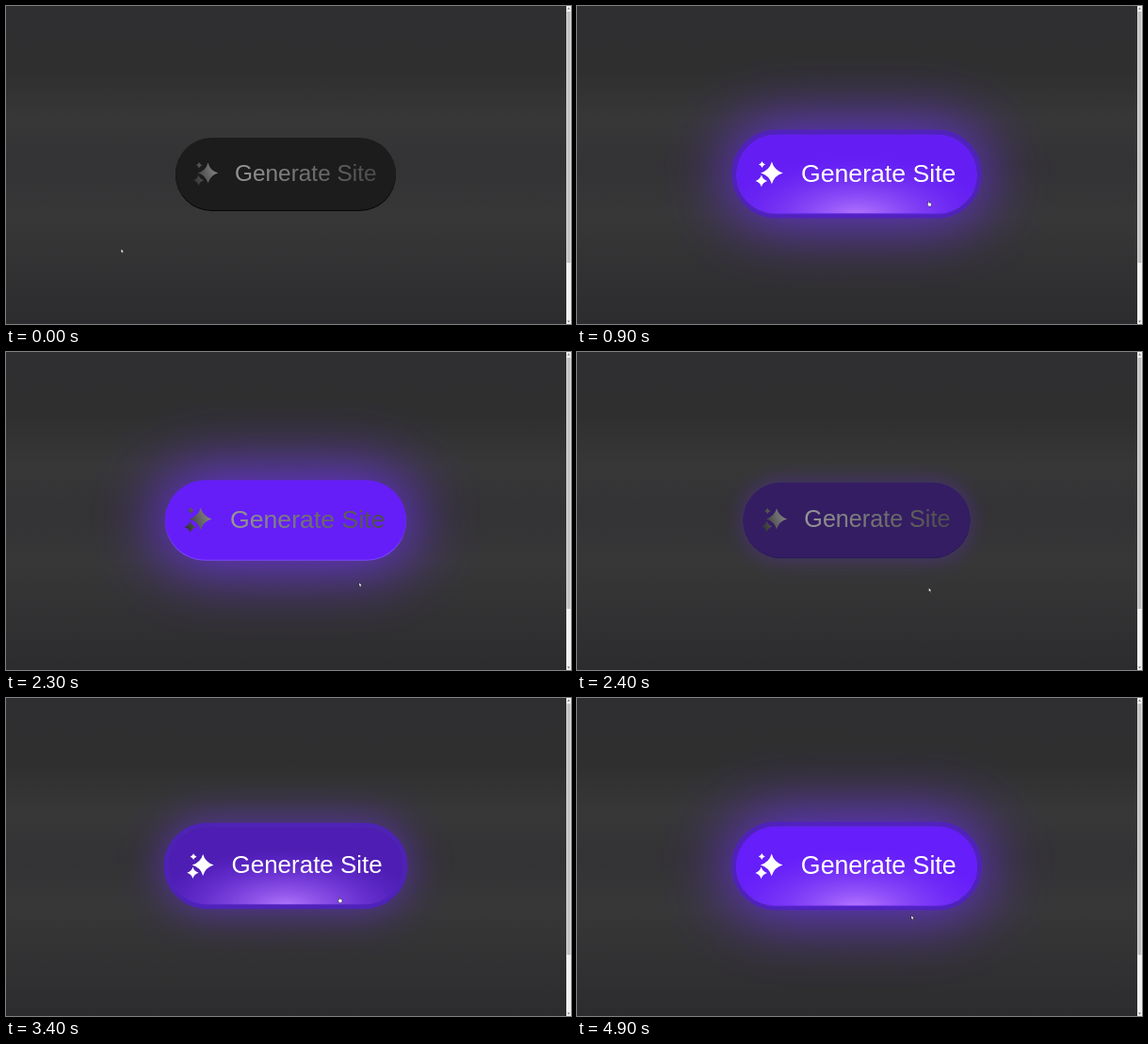
An HTML page that plays this animation: 600 px wide and 338 px high, repeating every 5 s.

```html
<!DOCTYPE html>
<html lang="en">
<head>
<meta charset="utf-8">
<title>Generate Site button</title>
<style>
  html, body { margin: 0; width: 100%; height: 100%; overflow: hidden; background: #333; }
  svg { display: block; width: 100vw; height: 100vh; }
  text { font: 24.4px "Liberation Sans", Arial, sans-serif; }
</style>
</head>
<body>
<svg viewBox="0 0 600 338" preserveAspectRatio="none">
  <defs>
    <linearGradient id="backdrop" x2="0" y2="1">
      <stop offset="0" stop-color="#2f2e30"/>
      <stop offset=".2" stop-color="#2f2f30"/>
      <stop offset=".36" stop-color="#373738"/>
      <stop offset=".5" stop-color="#333234"/>
      <stop offset=".66" stop-color="#373738"/>
      <stop offset="1" stop-color="#2c2b2d"/>
    </linearGradient>
    <linearGradient id="dimText" gradientUnits="userSpaceOnUse" x1="244" x2="393" y1="0" y2="0">
      <stop stop-color="#969696"/><stop offset="1" stop-color="#4b4b4b"/>
    </linearGradient>
    <linearGradient id="dimIcon" gradientUnits="userSpaceOnUse" x1="199" x2="225" y1="186" y2="176">
      <stop stop-color="#303030"/><stop offset="1" stop-color="#868686"/>
    </linearGradient>
    <radialGradient id="shine" gradientUnits="userSpaceOnUse" cx="0" cy="0" r="1"
      gradientTransform="translate(297 219) scale(132 58)">
      <stop stop-color="#b87cff" stop-opacity=".95"/>
      <stop offset=".45" stop-color="#9455f5" stop-opacity=".6"/>
      <stop offset="1" stop-color="#7030f0" stop-opacity="0"/>
    </radialGradient>
    <filter id="soft" filterUnits="userSpaceOnUse" x="0" y="0" width="600" height="338"
      color-interpolation-filters="sRGB">
      <feGaussianBlur id="blur" stdDeviation="1"/>
    </filter>
  </defs>

  <rect width="600" height="338" fill="url(#backdrop)"/>

  <g id="button">
    <rect id="glow" fill="#6e32f0" filter="url(#soft)"/>
    <rect id="rim" x="180" y="141" width="234" height="77" rx="38.5"/>
    <rect id="face" x="180" y="140" width="234" height="77" rx="38.5"/>
    <g id="lit">
      <rect x="180" y="140" width="234" height="77" rx="38.5" fill="url(#shine)"/>
      <rect x="177.75" y="137.75" width="238.5" height="81.5" rx="40.75"
        fill="none" stroke="#501ec8" stroke-opacity=".8" stroke-width="4.5"/>
    </g>
    <g id="icon"></g>
    <text id="label" x="243" y="186">Generate Site</text>
  </g>

  <g id="scrollbar">
    <rect x="595" width="5" height="338" fill="#f1f1f1"/>
    <rect x="595.6" y="6" width="3.8" height="267" fill="#c1c1c1"/>
    <path d="M596 3.5l1.5-2 1.5 2zM596 334.5l1.5 2 1.5-2z" fill="#777"/>
  </g>

  <g id="cursor" fill="#fff" stroke="#000" stroke-width=".4">
    <path id="arrow" d="M0 0V4.4L1 3.5 1.8 5.2 2.5 4.9 1.8 3.2H3.1Z"/>
    <path id="hand" d="M.5 0Q1.1-.3 1.2.6V2L3 2.4Q3.8 2.6 3.7 3.4L3.2 6H.8L-1 3.6Q-.8 2.8 0 3.4Z"/>
  </g>
</svg>

<script>
const LOOP = 5000, FADE = 250;
const $ = id => document.getElementById(id);
const set = (id, attrs) => {
  for (const name in attrs) $(id).setAttribute(name, attrs[name]);
};
const mix = (a, b, k) => a + (b - a) * k;
const mixColor = (a, b, k) => `rgb(${a.map((v, i) => Math.round(mix(v, b[i], k)))})`;

// Hover spans as [enter, leave], in ms
const hovers = [[700, 2300], [3300, LOOP]];

// Pointer path as [time, x, y]
const path = [
  [0, 122, 258], [200, 160, 262], [400, 250, 240], [500, 320, 215], [600, 372, 181],
  [700, 373, 207], [1400, 372, 207], [1800, 373, 211], [2200, 375, 230], [2300, 375, 245],
  [2700, 369, 267], [3000, 368, 263], [3300, 355, 215], [3600, 350, 205], [3900, 348.5, 204.5],
  [4200, 345, 206], [4500, 348.5, 205], [4600, 348.5, 205], [4900, 355, 231], [LOOP, 355, 231]
];

const star = (x, y, r) => {
  const c = r * 0.22;
  return `<path d="M${x} ${y - r}Q${x + c} ${y - c} ${x + r} ${y}Q${x + c} ${y + c} ${x} ${y + r}` +
    `Q${x - c} ${y + c} ${x - r} ${y}Q${x - c} ${y - c} ${x} ${y - r}Z"/>`;
};
$('icon').innerHTML = star(214.5, 177.5, 10.8) + star(204.4, 185.3, 5.8) + star(205, 169.3, 3.2);

const ease = k => 1 - (1 - Math.min(1, Math.max(0, k))) ** 2.2;

function hoverAmount(t) {
  const span = hovers.findLast(([enter]) => t >= enter);
  if (!span) return 0;
  const [enter, leave] = span;
  return t < leave ? ease((t - enter) / FADE) : 1 - ease((t - leave) / FADE);
}

function pointerAt(t) {
  const i = path.findIndex(([time]) => time > t);
  const [t0, x0, y0] = path[i - 1], [t1, x1, y1] = path[i];
  const k = (t - t0) / (t1 - t0);
  return [mix(x0, x1, k), mix(y0, y1, k)];
}

function draw(t) {
  const hovered = hovers.some(([enter, leave]) => t >= enter && t < leave);
  const amount = hoverAmount(t);
  const spread = 10 * amount;
  const [x, y] = pointerAt(t);

  set('button', {
    transform: `translate(297 178.5) scale(${1 + 0.095 * amount}) translate(-297 -178.5)`
  });
  set('glow', {
    x: 180 - spread, y: 140 - spread, width: 234 + 2 * spread, height: 77 + 2 * spread,
    rx: 38.5 + spread, opacity: 0.9 * amount
  });
  set('blur', { stdDeviation: 0.1 + 31 * amount });
  set('face', { fill: mixColor([28, 28, 28], [102, 30, 250], amount) });
  set('rim', { fill: mixColor([5, 5, 5], [125, 69, 255], amount) });
  set('lit', { opacity: hovered ? 1 : 0 });
  set('icon', { fill: hovered ? '#fff' : 'url(#dimIcon)' });
  set('label', { fill: hovered ? '#fff' : 'url(#dimText)' });

  const pointing = hovered && y < 225;
  set('cursor', { transform: `translate(${x} ${y})` });
  set('arrow', { opacity: pointing ? 0 : 1 });
  set('hand', { opacity: pointing ? 1 : 0 });
}

function tick() {
  draw(performance.now() % LOOP);
  requestAnimationFrame(tick);
}
tick();
</script>
</body>
</html>
```
